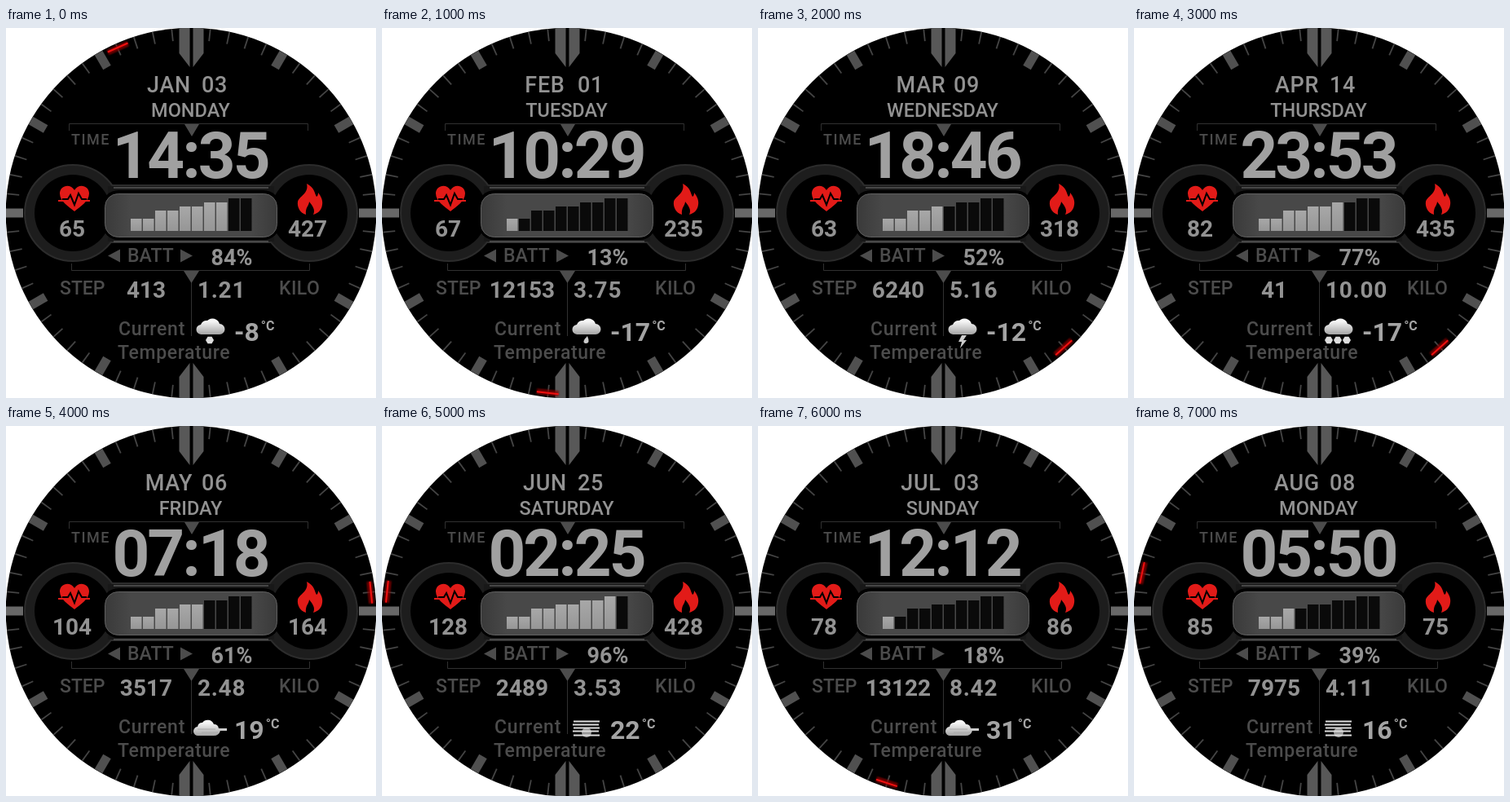
An HTML page for the animation above (8 s loop, 454x454 px).

```html
<!DOCTYPE html>
<html lang="en">
<head>
<meta charset="utf-8">
<title>Watch face</title>
<style>
  html, body { margin: 0; width: 100%; height: 100%; overflow: hidden; background: #fff; }
  svg { display: block; width: 454px; height: 454px; }
  text { font: 500 28px Roboto, "Open Sans", sans-serif; fill: #929292; }
  .mid { text-anchor: middle; }
  .label { font-size: 23px; fill: #4c4c4c; }
  .date { font-size: 27px; letter-spacing: .7px; }
  .value { font-weight: 600; }
  #clock { font-size: 80px; font-weight: 700; letter-spacing: -3px; fill: #a0a0a0; }
  #icons > g { display: none; }
</style>
</head>
<body>
<svg viewBox="0 0 454 454">
  <defs>
    <clipPath id="round"><circle cx="227" cy="227" r="227.300" shape-rendering="crispEdges"/></clipPath>
    <linearGradient id="panel">
      <stop offset="0" stop-color="#3a3a3a"/><stop offset=".15" stop-color="#484848"/>
      <stop offset=".85" stop-color="#484848"/><stop offset="1" stop-color="#3a3a3a"/>
    </linearGradient>
    <linearGradient id="lit" x2="0" y2="1">
      <stop stop-color="#a8a8a8"/><stop offset="1" stop-color="#969696"/>
    </linearGradient>
    <linearGradient id="cloudFill" x2="0" y2="1">
      <stop offset=".2" stop-color="#f4f4f4"/><stop offset="1" stop-color="#a4a4a4"/>
    </linearGradient>
    <filter id="soft"><feGaussianBlur stdDeviation="1"/></filter>
    <path id="cloud" fill="url(#cloudFill)" d="M240 376a6 6 0 0 1-1-12a8 8 0 0 1 8-5a9 9 0 0 1 15 4a6.500 6.500 0 0 1 0 13z"/>
    <path id="flake" fill="#ddd" d="M-2.500-4.300h5l2.500 4.300l-2.500 4.300h-5l-2.500-4.300z"/>
    <path id="batonHalf" d="M225.500 0v48l-13-17V0z"/>
  </defs>

  <g clip-path="url(#round)">
    <rect width="454" height="454"/>
    <g id="ticks"></g>
    <g fill="#585858">
      <use href="#batonHalf"/>
      <use href="#batonHalf" transform="matrix(-1 0 0 1 455 0)"/>
      <use href="#batonHalf" transform="matrix(1 0 0 -1 0 459)"/>
      <use href="#batonHalf" transform="rotate(180 227.5 229.5)"/>
    </g>
    <g id="second">
      <rect x="214" y="2" width="27" height="7" fill="#8a0000" opacity=".8" filter="url(#soft)"/>
      <rect x="214" y="4" width="27" height="2" fill="#f01010"/>
    </g>

    <path d="M77.500 126v-8.500h293v8.500M80.500 289v8.500h292v-8.500M227.500 298v80" fill="none" stroke="#303030"/>
    <path d="M219 118h18l-9 15zM218 298h19l-9.500 15zM125 279.500l15-8v16zM229 279.500l-15-8v16z" fill="#4c4c4c"/>

    <g fill="#1d1d1d" stroke="#2c2c2c" stroke-width="2">
      <path d="M125 193h204M125 263h204"/>
      <circle cx="82" cy="227" r="59"/><circle cx="372" cy="227" r="59"/>
    </g>
    <rect x="125" y="194" width="204" height="68" fill="#181818"/>
    <circle cx="82" cy="227" r="47"/><circle cx="372" cy="227" r="47"/>
    <rect x="118" y="199" width="218" height="61" rx="20"/>
    <path d="M132 196h190M132 262h190" stroke="#555" stroke-width="1.500"/>
    <rect x="121.500" y="203.500" width="211" height="53" rx="16" fill="url(#panel)" stroke="#606060"/>
    <g id="bars"></g>

    <path d="M84 225C77 219 66 213 66 203C66 193 79 190 84 199C89 190 102 193 102 203C102 213 91 219 84 225z" fill="#e21b18"/>
    <path d="M64 212h9M95 212h8" stroke="#e21b18" stroke-width="2"/>
    <path d="M69 210h7l3-5l5 12l5-14l4 7h6" fill="none" stroke="#000" stroke-width="2"/>
    <path d="M369 191C379 196 378 202 381 207C383 206 383 203 383 202C387 207 389 212 388 217C387 224 383 227 377 229C380 223 376 218 372 213C372 218 367 220 368 229C361 227 357 220 358 213C360 206 372 203 369 191z" fill="#e21b18"/>

    <text x="80" y="143" class="label" style="font-size:18px;letter-spacing:1.5px">TIME</text>
    <text x="149" y="287" class="label">BATT</text>
    <text x="66" y="326.500" class="label">STEP</text>
    <text x="335" y="326.500" class="label" style="letter-spacing:.4px">KILO</text>
    <text x="138" y="377" class="label" style="letter-spacing:.8px">Current</text>
    <text x="137" y="406" class="label" style="letter-spacing:.6px">Temperature</text>

    <text id="month" x="200" y="79" class="date mid"></text>
    <text id="day" x="240" y="79" class="date"></text>
    <text id="weekday" x="226.500" y="109" class="mid" style="font-size:23.5px"></text>
    <text id="clock" x="226" y="183.500" class="mid"></text>
    <text id="pulse" x="81" y="256" class="mid value"></text>
    <text id="burn" x="370" y="256" class="mid value"></text>
    <text id="power" x="277" y="290.500" class="mid value" style="font-size:27px"></text>
    <text id="steps" x="172" y="331" class="mid value"></text>
    <text id="kilo" x="235" y="331" class="value" style="letter-spacing:.7px"></text>
    <text x="280" y="384" class="value" style="font-size:32px;fill:#a4a4a4"><tspan id="temp"></tspan><tspan dx="2" dy="-13" font-size="16">°C</tspan></text>

    <g id="icons">
      <g id="snow"><use href="#cloud"/><use href="#flake" x="250" y="383"/></g>
      <g id="rain"><use href="#cloud"/><path d="M252 378q4 9-2 9q-6-1 2-9" fill="#ccc"/></g>
      <g id="storm"><use href="#cloud"/><path d="M250 377h6l-4 6h4l-8 10l2-8h-4z" fill="#ccc"/></g>
      <g id="sleet">
        <use href="#cloud"/><use href="#flake" x="239" y="383"/>
        <use href="#flake" x="250" y="383"/><use href="#flake" x="261" y="383"/>
      </g>
      <g id="fog">
        <circle cx="251" cy="376" r="6" fill="#999"/>
        <path d="M235 362.500h32M234 366.500h32M235 370.500h32M234 374.500h32M235 379.500h32" stroke="#ddd" stroke-width="1.800"/>
      </g>
      <g id="wind">
        <path d="M236 380a5.500 5.500 0 0 1-1-11a6 6 0 0 1 6-5a8 8 0 0 1 14 2a6 6 0 0 1 6 5h10v3h-8q-2 6-8 6z" fill="url(#cloudFill)"/>
        <path d="M235 372h22M240 376h20" stroke="#aaa"/>
      </g>
    </g>
  </g>
</svg>
<script>
const $ = id => document.getElementById(id);
const fields = ["month", "day", "weekday", "clock", "pulse", "burn", "power", "steps", "kilo", "temp"];
// The fields above, then the weather icon and the second shown on the rim.
const states = `
JAN 03 MONDAY 14:35 65 427 84% 413 1.21 -8 snow 56
FEB 01 TUESDAY 10:29 67 235 13% 12153 3.75 -17 rain 31
MAR 09 WEDNESDAY 18:46 63 318 52% 6240 5.16 -12 storm 23
APR 14 THURSDAY 23:53 82 435 77% 41 10.00 -17 sleet 23
MAY 06 FRIDAY 07:18 104 164 61% 3517 2.48 19 wind 14
JUN 25 SATURDAY 02:25 128 428 96% 2489 3.53 22 fog 46
JUL 03 SUNDAY 12:12 78 86 18% 13122 8.42 31 wind 33
AUG 08 MONDAY 05:50 85 75 39% 7975 4.11 16 fog 47`.trim().split("\n").map(row => row.split(" "));

function addRect(parent, attrs) {
  const rect = document.createElementNS("http://www.w3.org/2000/svg", "rect");
  for (const name in attrs) rect.setAttribute(name, attrs[name]);
  return parent.appendChild(rect);
}

for (let i = 0; i < 60; i++) {
  if (i % 30 === 0) continue;
  const major = i % 5 === 0, width = major ? 11 : 1.8;
  addRect($("ticks"), {
    x: 227 - width / 2, y: 0, width, height: major ? 21 : 15,
    fill: i % 15 === 0 ? "#686868" : major ? "#505050" : "#444",
    transform: `rotate(${i * 6} 227 227)`
  });
}

const tops = [234, 224, 219, 214, 209];
const bars = Array.from({ length: 10 }, (_, i) => {
  const y = tops[i >> 1];
  return addRect($("bars"), { x: 153 + i * 15, y, width: 13.5, height: 249 - y });
});

let shown = -1;
function draw(now) {
  const index = Math.floor(now / 1000) % states.length;
  if (index !== shown) {
    shown = index;
    const state = states[index];
    fields.forEach((id, i) => $(id).textContent = state[i]);
    const [icon, second] = state.slice(fields.length);
    for (const group of $("icons").children) group.style.display = group.id === icon ? "inline" : "none";
    $("second").setAttribute("transform", `rotate(${second * 6} 227 227)`);
    const lit = Math.floor(parseInt(state[6]) / 10);
    bars.forEach((bar, i) => bar.setAttribute("fill", i < lit ? "url(#lit)" : "#0a0a0a"));
  }
  requestAnimationFrame(draw);
}
draw(performance.now());
</script>
</body>
</html>
```
